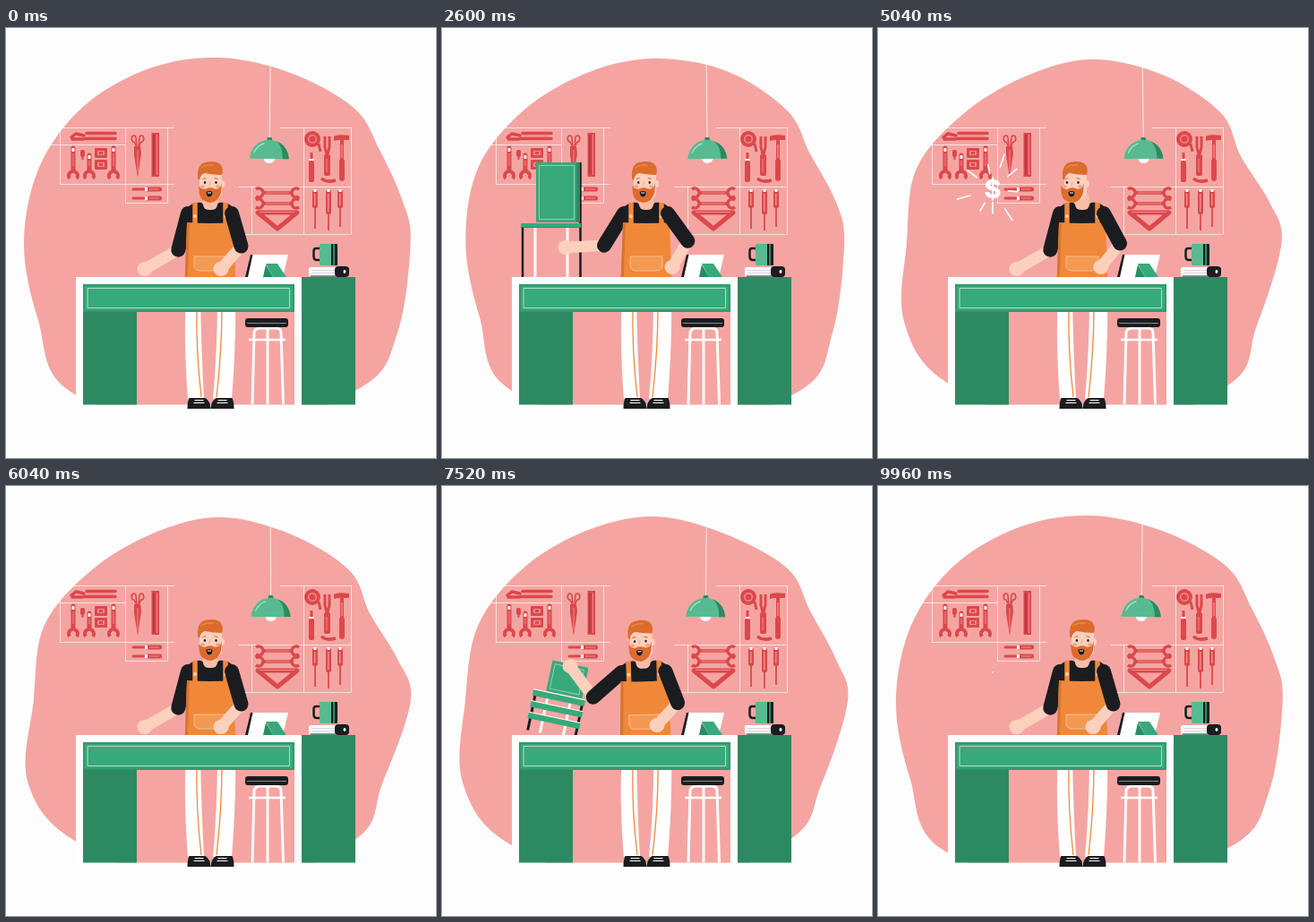
These frames come from a looping animation (480 by 480 pixels, 10 s). An HTML page with a canvas:

```html
<!DOCTYPE html>
<html lang="en">
<head>
<meta charset="utf-8">
<title>Workshop</title>
<style>
  html, body { margin: 0; width: 100%; height: 100%; overflow: hidden; background: #fdfdfd; }
  canvas { display: block; width: 480px; height: 480px; }
</style>
</head>
<body>
<canvas id="stage" width="480" height="480"></canvas>
<script>
const g = document.getElementById('stage').getContext('2d');
const LOOP = 10000;
const PINK = '#f4a5a2', GREEN = '#38a97a', MINT = '#57ba90', DARK = '#2c8a62', BLACK = '#1b1c20', WHITE = '#fff';
const ORANGE = '#f0883a', RUST = '#d9742e', HAIR = '#dc6c2c', SKIN = '#fdd0bd', RED = '#dc484b', ROSE = '#f3898a';

// Drawing helpers
function fill(d, color) { g.fillStyle = color; g.fill(new Path2D(d)); }
function line(d, color, width = 1, cap = 'butt') {
  g.strokeStyle = color; g.lineWidth = width; g.lineCap = cap; g.lineJoin = 'round';
  g.stroke(new Path2D(d));
}
function rect(x, y, w, h, color, r = 0) {
  g.fillStyle = color; g.beginPath(); g.roundRect(x, y, w, h, r); g.fill();
}
function frameRect(x, y, w, h, color) {
  g.strokeStyle = color; g.lineWidth = 1; g.strokeRect(x, y, w, h);
}
function oval(x, y, rx, ry, color) {
  g.fillStyle = color; g.beginPath(); g.ellipse(x, y, rx, ry, 0, 0, 7); g.fill();
}
function at(x, y, deg, draw, scale = 1) {
  g.save(); g.translate(x, y); g.rotate(deg * Math.PI / 180); g.scale(scale, scale);
  draw(); g.restore();
}

// Motion helpers
function ramp(t, from, to) {
  const u = Math.min(1, Math.max(0, (t - from) / (to - from)));
  return u * u * (3 - 2 * u);
}
const mix = (a, b, u) => a.map((v, i) => v + (b[i] - v) * u);
const wave = (t, peak) => Math.cos((t / LOOP - peak) * 2 * Math.PI);

// Outline points: angle, mean radius, swell, moment of the swell's peak
const outline = [
  [0, 213, 2, .8], [27, 215, 11, .12], [46, 223, 8, .2], [90, 215, 0], [135, 229, 6, .05],
  [157, 223, 11, .7], [180, 212, 6], [203, 215, 3], [225, 209, 6], [248, 205, 5],
  [270, 206, 1], [293, 205, 3, .2], [315, 209, 4], [330, 200, 7], [347, 207, 3]
];
function backdrop(t) {
  const p = outline.map(([deg, radius, swell, peak = 0]) => {
    const a = deg * Math.PI / 180, r = radius + swell * wave(t, peak);
    return [238 + r * Math.cos(a), 240 + r * Math.sin(a)];
  });
  const n = p.length;
  g.save();
  g.beginPath(); g.rect(0, 0, 480, 420.5); g.clip();
  g.beginPath(); g.moveTo(...p[0]);
  for (let i = 0; i < n; i++) {
    const [a, b, c, d] = [n - 1, 0, 1, 2].map(k => p[(i + k) % n]);
    g.bezierCurveTo(b[0] + (c[0] - a[0]) / 6, b[1] + (c[1] - a[1]) / 6,
      c[0] - (d[0] - b[0]) / 6, c[1] - (d[1] - b[1]) / 6, ...c);
  }
  g.fillStyle = PINK; g.fill();
  g.restore();
}

// Wall tools
function wrench(x, y, length) {
  line(`M${x} ${y}v${length - 9}`, RED, 5, 'round');
  line(`M${x} ${y + 6}v${length - 20}`, ROSE, 1);
  line(`M${x - 4} ${y + length}a5 5 0 1 1 8 0`, RED, 4);
  rect(x - 1.5, y, 3, 4, WHITE, 1);
}
function driver(x, handle, length) {
  rect(x - 3, 181, 6, handle, RED, 2);
  rect(x - 1, 185, 1.5, handle - 7, ROSE);
  rect(x - 1.5, 180, 3, 3, WHITE);
  line(`M${x} ${181 + handle}v${length}`, RED, 1.8);
}
function knife(y) {
  line(`M142 ${y}H156`, RED, 3, 'round');
  rect(156, y - 2.5, 18, 5, RED, 2);
  rect(155, y - 2, 3, 4, WHITE);
  line(`M160 ${y}h11`, ROSE, 1);
}
function wall() {
  line('M62 111.5H188M50 130.5H133M60 174.5H188M133 195.5H180M60.5 111V174M133.5 111V195M180.5 111V195' +
    'M306 111.5H385M260 177.5H385M260 230.5H385M274.5 177V230M332.5 111V230M385.5 111V230',
    'rgba(255,255,255,.65)');
  // Left side
  line('M73 122l5-4 9 2M74 124h12', RED, 3.5, 'round');
  line('M90 117.5H122M88 123.5H122', RED, 3.5, 'round');
  line('M92 120.5H119', ROSE, 1.5);
  wrench(75, 134, 34); wrench(93, 142, 26); wrench(120, 134, 34);
  rect(83, 136, 5, 8, RED, 2); line('M85.5 143v4', RED, 2);
  for (const y of [134, 147]) {
    rect(99, y, 14, 11, RED, 1); rect(102, y + 3, 8, 5, ROSE, 1); rect(104, y + 4, 4, 3, RED);
  }
  line('M146 133l-3-6a2.500 3.500 0 1 1 2-5zM148 133l3-6a2.500 3.500 0 1 0-2-5z', RED, 1.6);
  fill('M143 132h7l1 8-4 27-4-25z', RED); line('M147 136V161', ROSE, 1);
  rect(162.5, 117, 8.5, 49, RED); rect(164, 119, 2, 45, '#b93940'); line('M168.500 119V164', ROSE, 1);
  knife(180); knife(190);
  // Right side
  oval(342, 124, 9, 9, RED); oval(342, 124, 5, 5, ROSE); oval(342, 124, 3.5, 3.5, RED);
  line('M349 129l2 9', RED, 3);
  rect(338, 148, 6, 24, RED, 2); line('M341 139v9', RED, 3); rect(338.5, 146, 5, 2, WHITE);
  line('M356 121v12l2 8M361 121v12l-2 8', RED, 3);
  rect(355, 141, 7, 24, RED, 2); line('M352 168q6 5 16 2', RED, 3.5); line('M358 146v15', ROSE, 1);
  fill('M366 121q4-3 17-1v5h-12l-5 1z', RED); line('M375 123V168', RED, 4, 'round');
  line('M375 130V145', ROSE, 1.5); rect(372, 146, 6, 25, RED, 3);
  for (const y of [184, 196]) {
    line(`M288 ${y}H319`, RED, 3.5); line(`M290 ${y}H316`, ROSE, 1);
    line(`M279 ${y - 4}a5 5 0 1 1 0 8M327 ${y - 4}a5 5 0 1 0 0 8`, RED, 3.5);
  }
  line('M281 206H325L303 224Z', RED, 5); line('M283 205.500H322', ROSE, 1);
  driver(345, 20, 23); driver(360, 27, 18); driver(373, 20, 21);
}

function lamp(t) {
  at(295.2, 40, .9 * wave(t, .9), () => {
    line('M0-10V84', 'rgba(255,255,255,.8)');
    oval(0, 106, 6, 5, WHITE);
    rect(-3, 82, 6, 4, DARK, 2);
    fill('M-22 106C-20 90-9 85 0 85S20 90 22 106Z', MINT);
    fill('M8 86.500C17 90 21 97 22 106H15C15 97 13 91 8 86.500Z', DARK);
    line('M-17 99Q-13 91-6 89', '#b5e2cd', 1.2, 'round');
  });
}

function stool() {
  line('M275 420L277 340Q278 335 284 335H301Q307 335 307 340L309.500 420M292 420V336', WHITE, 3);
  line('M271 348H312', WHITE, 2.5);
  rect(267, 324, 48, 10, BLACK, 3);
  line('M269 329.500H313', '#8b8c90', 1);
}

// Both chairs are drawn around the point where they are gripped.
function tallChair() {
  line('M-34-22V33M2-22V33', WHITE, 3);
  line('M-48-25V33M16.500-95V33', BLACK, 2.5);
  rect(-33, -95, 49, 67, GREEN);
  rect(12, -95, 4, 67, DARK);
  frameRect(-29.5, -91.5, 39, 60, '#8fd0b2');
  rect(-50, -27, 67, 5, GREEN);
  line('M-50-22.500H17', DARK, 1);
}
function slatChair() {
  line('M-17 35V79M9 35V79', WHITE, 3);
  line('M-31 35V79M22.500 33V79', BLACK, 3);
  rect(-20, -3, 41, 35, GREEN, 1);
  frameRect(-16.5, 0.5, 33, 28, '#8fd0b2');
  for (const y of [33, 46, 59]) {
    rect(-34, y, 59, 7, GREEN);
    line(`M-34 ${y}h59`, WHITE, 1);
  }
}

// Each job: bend down, raise a chair, hold it, sell it.
const REST = [155, 269], LOW = [145, 298];
const jobs = [
  { chair: tallChair, bend: 600, rise: 1150, sell: 4500, hold: [138, 245], spread: 17, side: 0,
    turn: (t, lift) => -148 * (1 - ramp(lift, .3, 1)) },
  { chair: slatChair, bend: 6100, rise: 6700, sell: 9060, hold: [144, 199], spread: 0, side: -28,
    turn: t => 12 * Math.sin(Math.PI * ramp(t, 6700, 8300)) }
];
function pose(t, { bend, rise, sell, hold, spread }) {
  const down = ramp(t, bend, bend + 500), lift = ramp(t, rise, rise + 900);
  const sold = ramp(t, sell, sell + 400), calm = 1 - ramp(t, sell + 550, sell + 900);
  const hand = mix(mix(mix(REST, LOW, down), hold, lift), REST, sold);
  hand[0] -= 14 * Math.sin(Math.PI * lift);
  return {
    hand, lift,
    lean: down * (1 - ramp(t, rise, rise + 1000)),
    look: (.25 * lift + .75 * ramp(t, sell - 100, sell + 250)) * calm,
    right: [240 + spread * lift * (1 - ramp(t, sell + 200, sell + 900)), 269 - 2 * lift * calm]
  };
}
function heldChair(t, job, { hand, lift }) {
  const scale = ramp(t, job.rise, job.rise + 150) * (1 - ramp(t, job.sell, job.sell + 220));
  if (scale > 0) {
    at(hand[0] + job.side * (1 - lift), hand[1] + 20 * (1 - lift), job.turn(t, lift), job.chair, scale);
  }
}

// Carpenter
function arm(shoulder, hand, upper, fore) {
  const dx = hand[0] - shoulder.x, dy = hand[1] - shoulder.y, d = Math.hypot(dx, dy);
  const along = Math.min(upper, (upper * upper - fore * fore + d * d) / (2 * d));
  const side = Math.sqrt(upper * upper - along * along);
  const elbow = [shoulder.x + (dx * along + dy * side) / d, shoulder.y + (dy * along - dx * side) / d];
  line(`M${elbow}L${hand}`, SKIN, 12.5, 'round');
  oval(...hand, 8.5, 8, SKIN);
  line(`M${shoulder.x} ${shoulder.y}L${elbow}`, BLACK, 16, 'round');
}
function legs(lean) {
  const bow = 4 * lean;
  fill(`M201 300Q${198 - bow * 1.5} 350 203 414H221Q${218 - bow} 360 ${217 + bow} 300Z`, WHITE);
  fill(`M${236 + bow} 300Q${236 + bow} 360 231 414H252Q${257 + bow} 350 256 300Z`, WHITE);
  line(`M213 312Q${212 - bow} 360 218 412M${241 + bow / 2} 312Q${241 + bow} 360 235 412`, ORANGE, 1.3);
  for (const [x, s] of [[215.5, 1], [241.5, -1]]) {
    g.save(); g.translate(x, 0); g.scale(s, 1);
    fill('M-11 413H7Q13 417 13 425H-13Q-13 417-11 413Z', BLACK);
    line('M-5 415.500H5M-6 418.500H6', WHITE, 1);
    g.restore();
  }
}
function head(look) {
  rect(220, 184, 16, 19, '#f8bda8', 6);
  g.translate(-8 * look, 0);
  rect(216, 155, 25, 37, SKIN, 9);
  oval(241, 174, 3, 4, SKIN);
  fill('M214 168Q213 152 222 150Q235 147 240 153Q243 158 241 164Q231 164 222 162Q217 163 216 170Z', HAIR);
  line('M218 156Q223 152 231 153', '#f09a55', 1, 'round');
  g.translate(-3 * look, 0);
  fill('M215 176Q219 181 223 179.500Q228 177 233 179.500Q239 181 241 173L240 184Q237 194 228 195Q218 194 216 186Z', HAIR);
  fill('M223.500 183Q227 181 230.500 183Q230.500 188 227 188.500Q223.500 188 223.500 183Z', BLACK);
  line('M225 184h4', WHITE, 1);
  oval(219.5, 177, 2.5, 1.8, '#f59d92'); oval(236.5, 177, 2.5, 1.8, '#f59d92');
  oval(222, 172.5, 1.2, 1.4, BLACK); oval(234.5, 172.5, 1.2, 1.4, BLACK);
  line('M219.500 168.500l4-1M232.500 167.500l4 1', HAIR, 1.2);
  line('M228 171l-1 5', '#eda58f', 1);
}
function apron() {
  fill('M204 199Q211 194 218 195Q228 205 238 195Q246 194 252 199L254 285H203Z', BLACK);
  line('M211 195V221M245 195V221', ORANGE, 5.5);
  fill('M202 217Q228 219 254 217L257 300H199Z', ORANGE);
  fill('M202 217h3L202 300H199Z', RUST);
  oval(211, 210, 2, 2, '#ffd19d'); oval(245, 210, 2, 2, '#ffd19d');
  const pocket = 'M210 255H246V266Q245 271 239 271H217Q211 271 210 266Z';
  fill(pocket, '#f29a54'); line(pocket, '#ffc793', .8);
}
function carpenter(t) {
  const job = t < 5600 ? jobs[0] : jobs[1], p = pose(t, job), lean = p.lean;
  const body = new DOMMatrix().translate(228 - 5 * lean, 290 + 4 * lean).rotate(-18 * lean).translate(-228, -290);
  const shoulder = x => body.transformPoint(new DOMPoint(x, 207));
  legs(lean);
  heldChair(t, job, p);
  arm(shoulder(203), p.hand, 42, 43);
  g.save();
  g.transform(body.a, body.b, body.c, body.d, body.e, body.f);
  apron();
  at(228 - 7 * lean, 198 + 5 * lean, -4 * lean, () => { g.translate(-228, -198); head(p.look); });
  g.restore();
  arm(shoulder(252), p.right, 38, 34);
}

function desk() {
  rect(86, 317, 60, 103.5, DARK);
  rect(86, 286, 236, 31, '#2f9a6c');
  rect(88, 288, 232, 27, GREEN);
  frameRect(91.5, 290.5, 225, 22, '#b0dfc8');
  rect(78, 278, 252, 8, WHITE); rect(78, 278, 8, 143, WHITE); rect(322, 278, 8, 143, WHITE);
  rect(330, 278, 60, 142.5, DARK);
  // Tablet
  fill('M274 253H315L309 278H268Z', WHITE);
  fill('M273 253h2.500L270 278H267Z', BLACK);
  fill('M290 263H303L313 278H298Z', GREEN); fill('M290 264L298 278H287Z', DARK);
  // Books and mug
  rect(338, 267, 40, 10, WHITE, 2); rect(367, 266, 16, 12, BLACK, 4);
  line('M341 270.500H367M341 273.500H367', '#c9cbc9', .8); line('M340 277H368', DARK, 1.5);
  oval(378, 272, 1.5, 2, WHITE);
  line('M351 246H346Q343.500 246 343.500 249V255Q343.500 259 347 259H351', BLACK, 2.5);
  rect(350, 241, 20, 24, MINT, 1); rect(363, 241, 7, 24, BLACK, 1); rect(365, 241, 2, 24, DARK);
}

// Burst of rays with a dollar sign; the first ray ends last, as a dot
function sale(t, start) {
  const u = (t - start) / 800, rays = 9;
  if (u <= 0 || u >= 1) return;
  at(128, 180, 0, () => {
    for (let i = 0; i < rays; i++) {
      const angle = (i / rays + .25) * 2 * Math.PI + .18 * Math.sin(i * 5);
      const reach = i ? 36 + 8 * Math.sin(i * 4.2) : 28;
      const far = reach * ramp(u, 0, .6), near = reach * ramp(u, 0, i ? .92 : 1.02);
      if (far - near < .05) continue;
      const c = Math.cos(angle), s = Math.sin(angle);
      line(`M${c * near} ${s * near}L${c * far} ${s * far}`, WHITE, 1.6, 'round');
    }
    const size = ramp(u, 0, .3) * (1 - ramp(u, .65, .9));
    g.scale(size, size);
    g.fillStyle = WHITE; g.font = '800 29px Inter, sans-serif';
    g.textAlign = 'center'; g.textBaseline = 'middle';
    g.fillText('$', 0, 1);
  });
}

function frame(now) {
  const t = now % LOOP;
  g.fillStyle = '#fdfdfd'; g.fillRect(0, 0, 480, 480);
  backdrop(t);
  wall();
  lamp(t);
  stool();
  carpenter(t);
  desk();
  for (const job of jobs) sale(t, job.sell + 120);
  requestAnimationFrame(frame);
}
requestAnimationFrame(frame);
</script>
</body>
</html>
```
